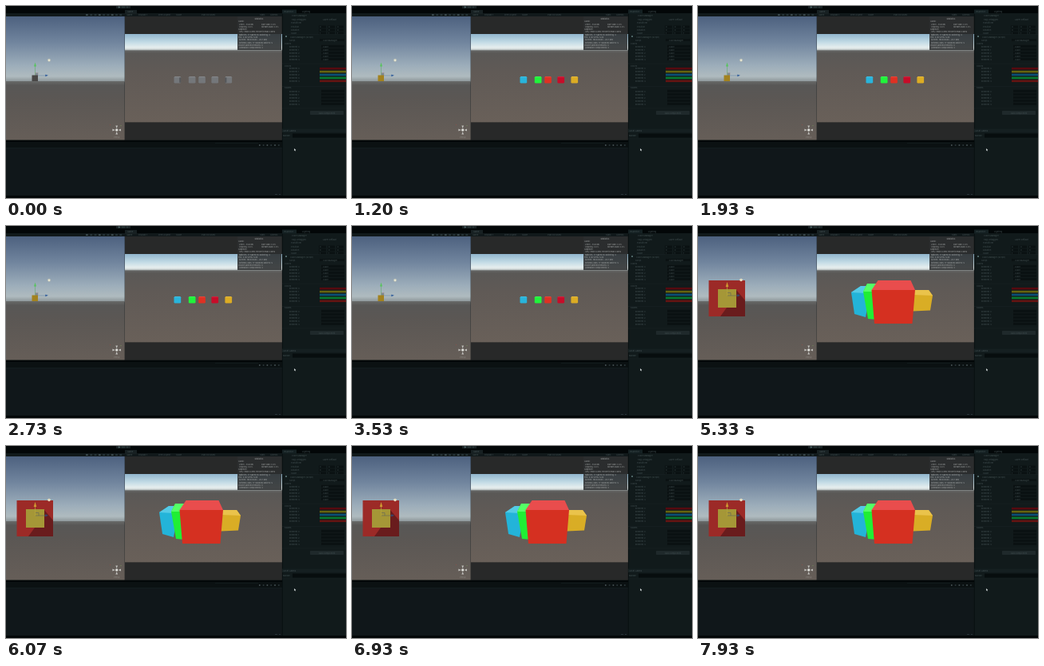
Write an HTML page that moves like this. It is 426x240 px and loops after 8000 ms.

```html
<!DOCTYPE html>
<html lang="en">
<head>
<meta charset="utf-8">
<title>Cube editor</title>
<style>
html, body { margin: 0; width: 100%; height: 100%; overflow: hidden; background: #0f1516; }
svg { display: block; width: 100vw; height: 100vh; }
text { font: 2.7px Inter, "Liberation Sans", sans-serif; fill: #435052; }
#stats text { font-size: 2.5px; fill: #a3a6a6; }
.plain, .tinted, .large { animation: 8s step-end infinite; }
.plain { animation-name: plain; }
.tinted { animation-name: tinted; }
.large { animation-name: large; }
.small { animation: small 8s step-end infinite; }
@keyframes plain { 0% { visibility: visible } 7.5%, 100% { visibility: hidden } }
@keyframes tinted { 0% { visibility: hidden } 7.5% { visibility: visible } 60.9%, 100% { visibility: hidden } }
@keyframes large { 0% { visibility: hidden } 60.9%, 100% { visibility: visible } }
@keyframes small { 0% { visibility: visible } 60.9%, 100% { visibility: hidden } }
</style>
</head>
<body>
<svg viewBox="0 0 426 240" preserveAspectRatio="none">
  <defs>
    <linearGradient id="sceneSky" x2="0" y2="1">
      <stop stop-color="#4d617f"/><stop offset=".4" stop-color="#71859e"/>
      <stop offset=".75" stop-color="#9cadba"/><stop offset=".92" stop-color="#afbbbf"/><stop offset="1" stop-color="#8c9598"/>
    </linearGradient>
    <linearGradient id="sceneGround" x2="0" y2="1">
      <stop stop-color="#686a69"/><stop offset=".07" stop-color="#585756"/>
      <stop offset=".3" stop-color="#5b5754"/><stop offset="1" stop-color="#665e58"/>
    </linearGradient>
    <linearGradient id="gameSky" x2="0" y2="1">
      <stop stop-color="#91b5cd"/><stop offset=".5" stop-color="#c4dce6"/>
      <stop offset=".8" stop-color="#e6eeee"/><stop offset=".9" stop-color="#d3dada"/><stop offset="1" stop-color="#858b8c"/>
    </linearGradient>
    <linearGradient id="gameGround" x2="0" y2="1">
      <stop stop-color="#656665"/><stop offset=".04" stop-color="#5a5856"/>
      <stop offset=".3" stop-color="#605a56"/><stop offset="1" stop-color="#696059"/>
    </linearGradient>
    <g id="cube">
      <path d="M0 1.5L1 .2H7.8L8.7 1.5V7.6L7.8 8.7H.8L0 7.8Z" fill="currentColor"/>
      <path d="M0 1.5L1 .2H7.8L8.7 1.5Z" fill="#fff" opacity=".1"/>
    </g>
  </defs>

  <!-- window frame -->
  <rect width="426" height="240" fill="#101718"/>
  <rect width="426" height="9" fill="#030708"/>
  <rect y="9" width="346" height="4.5" fill="#11191b"/>
  <rect x="149" y="5" width="15" height="5" fill="#172022"/>
  <text x="152" y="8.2">Game</text>
  <rect x="138" width="18" height="3" fill="#172022"/>
  <path d="M141 .5l2 1-2 1zM146 .5v2M148 .5v2M152 .5v2" fill="#4d6467" stroke="#4d6467" stroke-width=".5"/>
  <g id="tools"></g>
  <text x="151" y="12.3">Game</text><text x="166" y="12.3">Display 1</text>
  <text x="191" y="12.3">Free Aspect</text><text x="213" y="12.3">Scale</text>
  <text x="245" y="12.3">Play Focused</text><text x="318" y="12.3">Stats</text><text x="331" y="12.3">Gizmos</text>

  <!-- scene view -->
  <rect y="13" width="148.7" height="81.5" fill="url(#sceneSky)"/>
  <rect y="94" width="148.7" height="73.7" fill="url(#sceneGround)"/>
  <g class="small">
    <path d="M37 87H50" stroke="#587fa3" stroke-width=".5"/>
    <path d="M36.5 87V75" stroke="#63a970" stroke-width=".6"/>
    <path d="M36.5 70.5l1.5 5h-3z" fill="#56c45c"/>
    <path d="M49.3 85.4l3.6 1.4-3.6 1.4z" fill="#315d9b"/>
    <rect x="37" y="83.8" width="3" height="3" fill="#7b8c96" stroke="#9b7670" stroke-width=".3"/>
  </g>
  <rect class="plain" x="32.5" y="86.5" width="7.5" height="7.5" fill="#494746"/>
  <rect class="tinted" x="32.5" y="86.5" width="7.5" height="7.5" fill="#a28220"/>
  <circle cx="54" cy="67.8" r="1.8" fill="#e6e6d2" stroke="#a9b1ad" stroke-width=".6"/>
  <g class="large">
    <rect x="13.5" y="68" width="45.5" height="45" fill="#9c2a27"/>
    <path d="M28 113l8-11h12V80l11 13v20z" fill="#691c1d"/>
    <rect x="25" y="79" width="23" height="23" fill="#a59737"/>
    <path d="M36.5 87V76" stroke="#b5a53e" stroke-width=".7"/>
    <path d="M36.5 70l1.8 6h-3.6z" fill="#d09a31"/>
    <path d="M37 87h13M37 83.5h4V87" fill="none" stroke="#676b56" stroke-width=".7"/>
    <path d="M49 85.2l4 1.6-4 1.6z" fill="#36476f"/>
    <circle cx="54" cy="67.5" r="1.7" fill="#e7dfc2"/>
  </g>
  <g>
    <path d="M138.7 150v10M133.7 155h10" stroke="#9d9b97" stroke-width=".6"/>
    <path d="M137.3 149.6h2.8l-1.4 3zM137.3 160.4h2.8l-1.4-3zM133.4 153.6v2.8l3-1.4zM144 153.6v2.8l-3-1.4z" fill="#c3c2be"/>
    <rect x="137.4" y="153.7" width="2.6" height="2.6" fill="#e6e6e2"/>
    <circle cx="130.5" cy="148.5" r=".6" fill="#8a504a"/><circle cx="144" cy="149.5" r=".6" fill="#72925a"/>
    <text x="135" y="164.6" style="fill:#8d8984">Persp</text>
  </g>

  <!-- game view -->
  <rect x="149" y="13" width="197" height="155" fill="#282929"/>
  <rect x="149" y="35" width="197" height="21" fill="url(#gameSky)"/>
  <rect x="149" y="55.5" width="197" height="89.8" fill="url(#gameGround)"/>
  <g id="plain" class="plain"></g>
  <g id="tinted" class="tinted"></g>
  <g class="large">
    <path d="M192 83l12-8h11v12l-5 27-14-4z" fill="#23b4d9"/>
    <path d="M192 83l12-8h11l-5 9z" fill="#55cae6"/>
    <path d="M207 82l5-10h12v45l-11-1z" fill="#20ef35"/>
    <path d="M207 82l5-10h12l-6 10z" fill="#54ff66"/>
    <path d="M269 86l2-6h18l5 7-3 18.5-22 1z" fill="#d9ad25"/>
    <path d="M269 86l2-6h18l5 7z" fill="#eac34b"/>
    <path d="M217.5 80H272l-3.5 42H221z" fill="#d53021"/>
    <path d="M217.5 80l8-12h41l5.5 12z" fill="#e94d4d"/>
  </g>
  <g id="stats">
    <rect x="290" y="13" width="55" height="42" fill="#2c2e2f" opacity=".88"/>
    <text x="317" y="16.6" text-anchor="middle">Statistics</text>
  </g>

  <!-- console -->
  <rect y="167.7" width="346" height="2.3" fill="#030708"/>
  <rect y="170" width="346" height="7.5" fill="#0b1112"/>
  <rect y="177" width="346" height="60" fill="#10171a"/>
  <path d="M0 177.5H346M262 171.5h54" stroke="#172022" stroke-width=".6"/>
  <g id="counts"></g>

  <!-- inspector -->
  <rect x="346" y="9" width="80" height="228" fill="#111a1b"/>
  <path d="M346.3 9V237" stroke="#050a0b" stroke-width=".6"/>
  <rect x="346" y="4.5" width="18" height="5" fill="#142022"/>
  <g id="inspector"></g>
  <path d="M346 35.5h80M346 72h80M346 100.5h80M346 128h80" stroke="#182325" stroke-width=".5"/>
  <rect x="381" y="131" width="42" height="5" rx=".7" fill="#1f292b"/>
  <text x="402" y="134.5" text-anchor="middle">Add Component</text>
  <rect x="346" y="153.5" width="80" height="4.5" fill="#151f21"/>
  <rect x="359" y="159.5" width="67" height="5" fill="#070d0e"/>
  <path d="M346 166h80" stroke="#182325" stroke-width=".5"/>
  <path d="M361 178v3l.8-.6.6 1 .6-.4-.6-.9h1z" fill="#c3caca"/>
  <rect y="237" width="426" height="3" fill="#030708"/>
  <path d="M337 235.5h3M342 235.5h2" stroke="#36444a" stroke-width=".6"/>
</svg>
<script>
const add = (id, markup) => document.getElementById(id).insertAdjacentHTML("beforeend", markup);
const label = (x, y, words) => `<text x="${x}" y="${y}">${words}</text>`;
const box = (x, y, w, h, fill) => `<rect x="${x}" y="${y}" width="${w}" height="${h}" fill="${fill}"/>`;

const places = [210.5, 228.8, 241.2, 257.4, 274.4];
const tints = ["#29b5dc", "#20f43b", "#df3123", "#c70c29", "#dcac24"];
places.forEach((x, i) => {
  const cube = color => `<use href="#cube" x="${x}" y="87.7" color="${color}"/>`;
  const sideX = i ? x : x + 6.7;
  const side = i === 0 || i === 4 ? box(sideX, 89.3, 2, 6.5, "#0004") : "";
  add("plain", cube("#74777a") + side);
  add("tinted", cube(tints[i]));
});

for (let i = 0; i < 9; i++) add("tools", box(100 + i * 5.3, 10.4, 2.8, 1.5, i % 3 ? "#2c3c40" : "#46585c"));
for (let i = 0; i < 6; i++) add("counts", box(317 + i * 4.8, 173.2, 1.6, 1.6, i % 2 ? "#2f3a3c" : "#4c585a"));

const stats = ["Audio:", "Level: -74.8 dB", "Clipping: 0.0%", "Graphics:", "CPU: main 4.2ms  render thread 0.8ms",
  "Batches: 17   Saved by batching: 0", "Tris: 2.0k   Verts: 5.2k", "Screen: 1920x1080 - 23.7 MB",
  "SetPass calls: 17   Shadow casters: 5", "Visible skinned meshes: 0", "Animation components: 0"];
stats.forEach((words, i) => add("stats", label(i % 3 ? 292 : 291, 20.2 + i * 3.3, words)));
add("stats", label(320, 23.5, "DSP load: 0.2%") + label(320, 26.8, "Stream load: 0.0%"));

const rows = [];
const field = (y, name) => rows.push(label(355, y + 1, name), box(395, y - 1.6, 29, 3, "#0a1112"));
rows.push(label(348, 8.2, "Inspector"), label(371, 8.2, "Lighting"), label(358, 13.3, "Cube Manager"));
rows.push(label(358, 17.5, "Tag Untagged"), label(397, 17.5, "Layer Default"), label(357, 22.3, "Transform"));
["Position", "Rotation", "Scale"].forEach((name, i) => {
  const y = 26 + i * 4;
  rows.push(label(357, y + 1, name));
  for (let j = 0; j < 3; j++) rows.push(box(392 + j * 11, y - 1.5, 9, 3, "#0a1112"), label(393 + j * 11, y + 1, i === 2 ? 1 : 0));
});
rows.push(box(350, 37, 2, 2, "#4c6465"), label(356, 39.5, "Cube Manager (Script)"));
rows.push(label(355, 43.5, "Script"), box(393, 41, 31, 3, "#0b1213"), label(397, 43.5, "CubeManager"), label(349, 47.5, "Cubes"));
rows.push(label(349, 75.5, "Colors"), label(349, 103, "Scales"));
const swatches = ["#560a0f", "#65630f", "#0b4f76", "#09782f", "#641412"];
for (let i = 0; i < 5; i++) {
  field(50.5 + i * 4, `Element ${i}`);
  rows.push(label(397, 51.5 + i * 4, "Cube"));
  rows.push(label(355, 79.3 + i * 3.9, `Element ${i}`), box(393, 76.9 + i * 3.9, 33, 2.6, swatches[i]));
  field(106.5 + i * 4, `Element ${i}`);
}
add("inspector", rows.join(""));
document.querySelector("svg").insertAdjacentHTML("beforeend", label(347, 156.8, "Asset Labels") + label(347, 163, "Bundle"));
</script>
</body>
</html>
```
